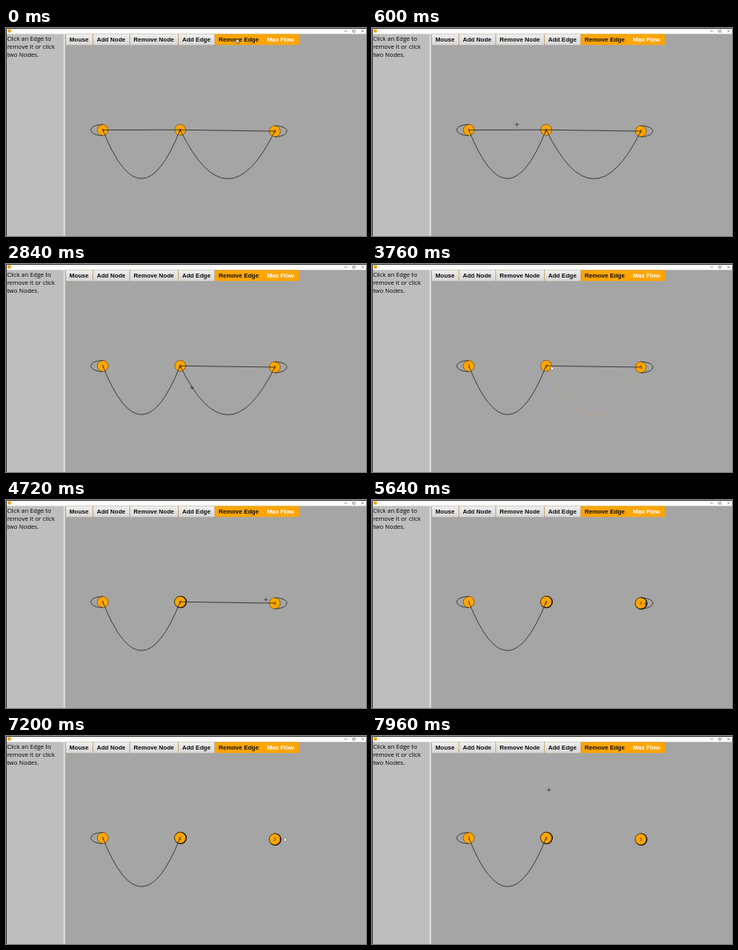
Write an HTML page that moves like this. It is 450 by 260 pixels and loops after 8000 ms.

```html
<!DOCTYPE html>
<html lang="en">
<head>
<meta charset="utf-8">
<title>Remove edges</title>
<style>
  html, body { margin: 0; width: 100%; height: 100%; overflow: hidden; background: #a5a5a5; }
  svg { display: block; width: 100%; height: 100%; }
  .hint { font: 7.55px "Open Sans", "Noto Sans", sans-serif; fill: #000; }
  .btn { font: bold 7.58px "Liberation Sans", Arial, sans-serif; text-anchor: middle; }
  .label { font: 5.5px "Open Sans", sans-serif; text-anchor: middle; }
</style>
</head>
<body>
<svg id="stage" viewBox="0 0 450 260">
  <linearGradient id="face" x2="0" y2="1">
    <stop stop-color="#efefef"/><stop offset="1" stop-color="#d6d6d6"/>
  </linearGradient>
</svg>
<script>
const LOOP = 8000, STEP = 40;
const ORANGE = '#ffa500', INK = '#1c1c1c';
const stage = document.getElementById('stage');

function add(tag, attrs, parent = stage, text) {
  const el = document.createElementNS('http://www.w3.org/2000/svg', tag);
  for (const k in attrs) el.setAttribute(k, attrs[k]);
  if (text) el.textContent = text;
  parent.appendChild(el);
  return el;
}
const rect = (x, y, width, height, fill, parent) => add('rect', { x, y, width, height, fill }, parent);
const path = (d, attrs, parent) => add('path', { d, fill: 'none', ...attrs }, parent);
const show = (el, on) => { el.style.display = on ? '' : 'none'; };

// Window, side panel and canvas
rect(0, 0, 450, 260, '#a5a5a5');
rect(0, 7, 71.5, 253, '#bebebe');
rect(71.5, 7, 2.5, 253, '#ded9d2');
rect(0, 0, 450, 7.4, '#fdfdfd');
path('M0.5 260V0.5H450', { stroke: '#333', 'stroke-width': 1 });
rect(2.2, 1.6, 4, 4, '#f0a018');
path('M423 4h3.4M433.5 2.6h2.6v2.6h-2.6zM444.3 2.4l2.8 2.8M447.1 2.4l-2.8 2.8',
  { stroke: '#555', 'stroke-width': 0.6 });

['Click an Edge to', 'remove it or click', 'two Nodes.'].forEach((line, i) =>
  add('text', { x: 1.2, y: 16.2 + 10 * i, class: 'hint' }, stage, line));

// Toolbar: each button is as wide as its label plus padding
const faces = add('g', {});
const labels = ['Mouse', 'Add Node', 'Remove Node', 'Add Edge', 'Remove Edge', 'Max Flow'];
let left = 75;
labels.forEach((label, i) => {
  const hot = i > 3;
  const text = add('text', { y: 17.1, class: 'btn', fill: i === 5 ? '#fff' : '#0c0c0c' }, stage, label);
  const w = text.getComputedTextLength() + 8.6;
  rect(left, 7.6, w + 1.6, 13.6, hot ? ORANGE : '#c4a468', faces);
  if (!hot) rect(left, 7.6, w + 0.6, 13.6, 'url(#face)', faces);
  text.setAttribute('x', left + w / 2);
  left += w + 1.6;
});

// Nodes; "picked" is when the heavy ring appears
const nodes = [
  { x: 121, y: 127.5, picked: Infinity },
  { x: 217.7, y: 127.3, picked: 3960 },
  { x: 336, y: 129, picked: 5240 }
];
nodes.forEach((n, i) => {
  n.ring = add('circle', { cx: n.x + 0.5, cy: n.y + 0.2, r: 7.8, fill: '#0c0c0c' });
  add('circle', { cx: n.x, cy: n.y, r: 6.9, fill: ORANGE, stroke: '#5a3c08', 'stroke-width': 0.6 });
  add('text', { x: n.x, y: n.y + 2.2, class: 'label', fill: INK }, stage, String(i + 1));
});

// Edges; "cut" turns one into a fading orange trace, "gone" clears it
const [a, b, c] = nodes;
const line = (p, q) => `M${p.x} ${p.y}L${q.x} ${q.y}`;
const sag = (p, q) => `M${p.x} ${p.y}Q${(p.x + q.x) / 2} ${p.y + 121.5} ${q.x} ${q.y}`;
const ear = (p, side) => {
  const x = p.x + side * 20;
  return `M${p.x} ${p.y - 6.8}C${x} ${p.y - 6.5} ${x} ${p.y + 6} ${p.x} ${p.y + 7.2}`;
};
const edges = [
  { d: ear(a, -1) },
  { d: sag(a, b) },
  { d: line(a, b), cut: 880, gone: 1640 },
  { d: sag(b, c), cut: 3200, gone: 4440 },
  { d: line(b, c), cut: 4880, gone: 5240 },
  { d: ear(c, 1), cut: 6800, gone: 7200 }
].map(e => ({ ...e, el: path(e.d, { 'stroke-width': 0.75 }) }));

// Cursor: plain cross while it moves, pointer while it rests
const cursor = add('g', {});
const shapes = {
  arrow: path('M0 -3V3L1.5 1.8L2.6 4L3.4 3.6L2.5 1.5H4.2Z',
    { fill: '#fff', stroke: '#222', 'stroke-width': 0.5 }, cursor),
  cross: path('M-2.6 0H2.6M0 -2.6V2.6', { stroke: '#333', 'stroke-width': 0.7 }, cursor),
  hand: path('M-0.9 -2.4Q-0.2 -3 0.2 -2.2V-1L1.8 -0.4Q2.2 1.6 1.1 2.5H-0.8L-2 0.4L-0.9 0.2Z',
    { fill: '#fff', stroke: '#444', 'stroke-width': 0.4 }, cursor)
};
const home = [288, 16];
const moves = [ // start, end, x, y
  [40, 840, 170.5, 131],
  [1800, 2120, 232, 155],
  [2760, 2880, 232.5, 154.5],
  [3200, 3720, 225, 130],
  [4040, 4240, 221, 129],
  [4440, 4760, 326.5, 124.5],
  [4760, 4920, 337, 130],
  [5600, 5800, 352, 129],
  [6000, 6240, 339, 131.5],
  [6320, 6560, 349, 129],
  [7480, 8000, 220.5, 67]
];

function cursorAt(t) {
  let [x, y] = home, moving = false;
  for (const [from, to, tx, ty] of moves) {
    if (t < from) break;
    moving = t < to;
    const p = moving ? 1 - (1 - (t - from) / (to - from)) ** 2 : 1;
    x += (tx - x) * p;
    y += (ty - y) * p;
  }
  return { x, y, kind: y < 21 ? 'arrow' : moving ? 'cross' : 'hand' };
}

function draw(t) {
  for (const n of nodes) show(n.ring, t >= n.picked);

  for (const { el, cut, gone } of edges) {
    const fade = t >= cut ? Math.min(1, (t - cut) / 400) : 0;
    show(el, !(t >= gone));
    el.setAttribute('stroke', t >= cut ? '#dc9c32' : INK);
    el.setAttribute('opacity', 1 - 0.35 * fade);
    el.setAttribute('stroke-dasharray', fade > 0.4 ? '6 3' : 'none');
  }

  const { x, y, kind } = cursorAt(t);
  for (const k in shapes) show(shapes[k], k === kind);
  cursor.setAttribute('transform', `translate(${x} ${y})`);
}

const start = performance.now();
function tick() {
  const t = (performance.now() - start) % LOOP;
  draw(Math.floor(t / STEP) * STEP);
  requestAnimationFrame(tick);
}
tick();
</script>
</body>
</html>
```
